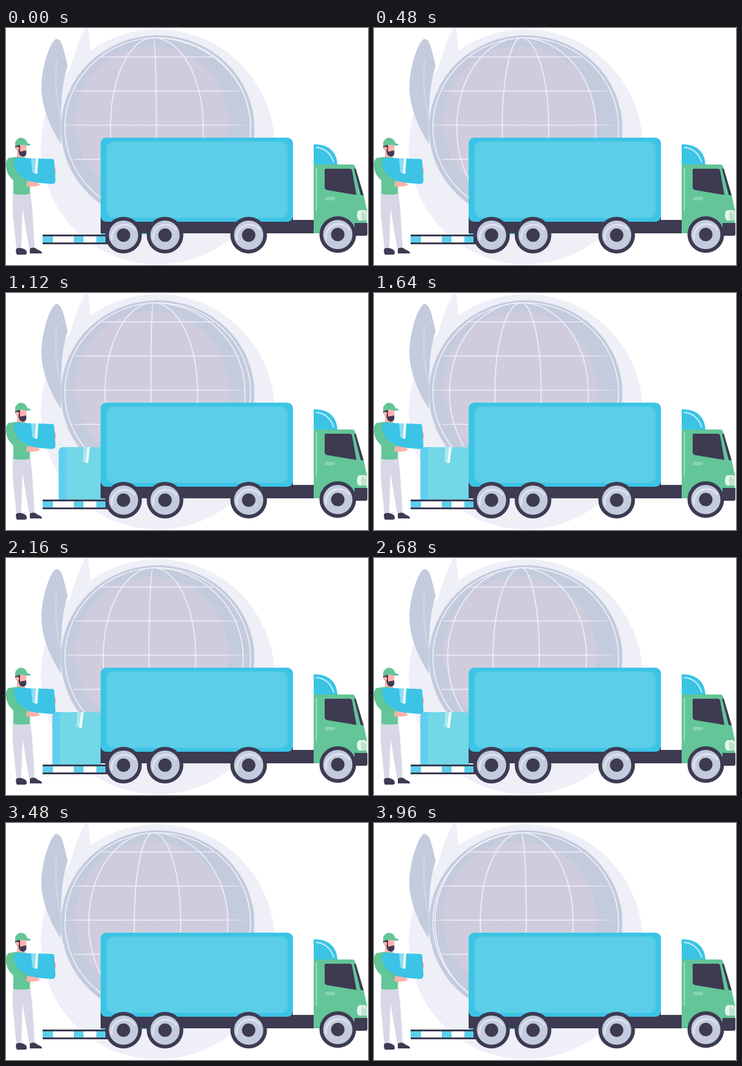
An HTML page that plays this animation: 593 by 389 pixels, repeating every 4 s.

```html
<!DOCTYPE html>
<html lang="en">
<head>
<meta charset="utf-8">
<title>Truck loading</title>
<style>
  html, body { margin: 0; width: 100%; height: 100%; overflow: hidden; background: #fff; }
  svg { display: block; width: 100vw; height: 100vh; }
  .dark { fill: #3d3a52; }
  .green { fill: #63c598; }
  .skin { fill: #fcb1ac; }
  .line { fill: none; stroke: #efeff7; stroke-width: 1.7; }
</style>
</head>
<body>
<svg viewBox="0 0 593 389">
  <defs>
    <linearGradient id="fade" gradientUnits="userSpaceOnUse" x1="97" y1="0" x2="393" y2="0">
      <stop offset="0" stop-color="#efeff7" stop-opacity=".5"/>
      <stop offset=".1" stop-color="#efeff7"/>
      <stop offset=".85" stop-color="#efeff7"/>
      <stop offset="1" stop-color="#efeff7" stop-opacity=".3"/>
    </linearGradient>
    <g id="wheel">
      <circle class="dark" r="30"/>
      <circle r="24" fill="#c3cbdd"/>
      <path d="M-19 8A21 21 0 0 1 19 -8" fill="none" stroke="#dfe3ee" stroke-width="3"/>
      <circle class="dark" r="11"/>
    </g>
  </defs>

  <!-- backdrop and leaves -->
  <ellipse cx="248.500" cy="195" rx="191.500" ry="193" fill="#eeeff7"/>
  <path d="M131 0C137 -1 136 22 139 42L150 90L92 140C98 80 116 22 131 0Z" fill="#eeeff7"/>
  <path d="M82 18C92 17 95 38 101 62C93 88 89 112 90 190C72 162 58 128 58 98C58 64 73 21 82 18Z" fill="#c3cbdd"/>
  <path d="M83 53C80 82 82 114 88 145" fill="none" stroke="#d3d3e1" stroke-width="3"/>

  <!-- globe -->
  <ellipse cx="248.500" cy="165" rx="158.500" ry="153" fill="#c3cbdd"/>
  <circle cx="239" cy="156" r="126" fill="#cfcddd"/>
  <ellipse class="line" cx="248.500" cy="163" rx="152" ry="147"/>
  <path d="M152 47.500H340M113 103.500H383M97 159.500H393M110 215.500H380" fill="none" stroke="url(#fade)" stroke-width="1.700"/>
  <g id="meridians"></g>

  <!-- ramp -->
  <path class="dark" d="M60 339H168V355H60Z"/>
  <path d="M60 342H163V352H60Z" fill="#fff"/>
  <path d="M60 342H77V352H60ZM111 342H127V352H111ZM148 342H163V352H148Z" fill="#5ccfe8"/>

  <!-- sliding parcel, placed at x = 0 -->
  <g id="parcel">
    <path d="M0 339V261Q0 253 8 253H72Q80 253 80 261V339Z" fill="#72d7e7"/>
    <path d="M0 339V261Q0 253 8 253H20Q12 253 12 261V339Z" fill="#5ecff0"/>
    <path d="M41 253H51L48 279L39 277Z" fill="#a9e6f0"/>
    <path d="M47 253H51L48 279H44Z" fill="#f2fbfd"/>
  </g>

  <!-- truck -->
  <path class="dark" d="M155 306H470V315H506V337H155Z"/>
  <rect x="155" y="180" width="315" height="138" rx="9" fill="#3bc4e6"/>
  <rect x="164.500" y="186" width="297.500" height="126" rx="12" fill="#50cae7"/>
  <rect x="165" y="186.500" width="294" height="125" rx="12" fill="#5bcee8"/>
  <path d="M504 191C528 190 542 203 543 225H504Z" fill="#3bc4e6"/>
  <path d="M508 196Q530 198 537 221" fill="none" stroke="#c9eff8" stroke-width="1.800"/>
  <path class="green" d="M504 224H567Q571 224 572 228L586 275L591 298V325H574V337H504Z"/>
  <path d="M508.500 229V300" stroke="#a5dec4" stroke-width="1.800"/>
  <path class="dark" d="M524 231H563Q566 231 567 234L574 274L526 266Q522 265 522 261V233Q522 231 524 231ZM570 231H573L586 275L581 274Z"/>
  <rect x="522" y="277" width="17" height="6" rx="3" fill="#87d3b0"/>
  <path d="M580 299H588Q590 299 591 305V316H580Q575 316 575 308Q575 299 580 299Z" fill="#e8f6ee"/>
  <path d="M583 300Q580 308 583 316H591V306Z" fill="#b9e6d0"/>
  <path class="dark" d="M571 320H592V338Q592 341 589 341H571Z"/>
  <use href="#wheel" x="192.500" y="340"/>
  <use href="#wheel" x="260.500" y="340"/>
  <use href="#wheel" x="397.500" y="340"/>
  <use href="#wheel" x="543.500" y="339"/>

  <!-- courier -->
  <path d="M11 270H40L43 298L47 362H38L27 296L25 362H17L11 302Z" fill="#d8d7e6"/>
  <path class="dark" d="M17 362Q25 359 33 365Q36 372 31 372H18Q15 367 17 362ZM39 362Q46 358 52 364Q60 367 59 370H39Z"/>
  <path class="skin" d="M18 200H31V214H18Z"/>
  <path class="skin" d="M18 192H33L34 207H22Z"/>
  <path class="dark" d="M15 192H23V203L33 201V208Q30 213 24 210Q21 208 20 199L15 196Z"/>
  <circle class="skin" cx="18.500" cy="198" r="3"/>
  <path class="green" d="M15 194V188Q18 180 25 180Q33 181 35 189L41 191Q39 194 34 193Q25 190 15 194Z"/>
  <path class="green" d="M8 213Q18 210 32 213Q41 222 40 245L39 272Q25 275 12 272V248Q0 238 0 224Q0 214 8 213Z"/>
  <path class="skin" d="M76 227Q82 226 82 234Q82 241 77 242ZM30 253L48 252L56 257Q50 262 32 260Z"/>
  <path d="M18 213L76 215Q79 215 79 219L81 250Q81 256 75 256L38 253Q13 247 13 222Q13 214 18 213Z" fill="#3bc4e6"/>
  <path d="M41 214H53L52 239L43 237Z" fill="#8bdeef"/>
  <path d="M49 214H53L51 239H47Z" fill="#e7f8fb"/>
  <path class="green" d="M5 213Q13 213 14 226Q18 243 37 250L34 260Q10 255 2 237Q-3 218 5 213Z"/>
  <path class="skin" d="M35 251L48 253L55 257Q49 261 33 259Z"/>
</svg>
<script>
const LOOP = 4000, LINES = 4;
const POLE_X = 241, GLOBE_Y = 163, GLOBE_RY = 147;
const parcel = document.getElementById('parcel');
const group = document.getElementById('meridians');

const meridians = Array.from({ length: LINES }, () => {
  const path = document.createElementNS('http://www.w3.org/2000/svg', 'path');
  path.setAttribute('class', 'line');
  return group.appendChild(path);
});

const ease = p => p < .5 ? 2 * p * p : 1 - 2 * (1 - p) ** 2;
const progress = (t, start, end) => ease(Math.min(1, Math.max(0, (t - start) / (end - start))));

// Each meridian crosses the globe from right to left in one loop.
function drawMeridian(path, turn) {
  const x = 401 - 304 * turn - 2.5 * Math.sin(Math.PI * turn);
  const rx = Math.max(.01, Math.abs(x - POLE_X));
  const sweep = x > POLE_X ? 1 : 0;
  path.setAttribute('d',
    `M${POLE_X} ${GLOBE_Y - GLOBE_RY}A${rx} ${GLOBE_RY} 0 0 ${sweep} ${POLE_X} ${GLOBE_Y + GLOBE_RY}`);
}

function draw(now) {
  const t = now % LOOP;
  meridians.forEach((path, i) => drawMeridian(path, (t / LOOP + i / LINES) % 1));
  const out = progress(t, 480, 1340) - progress(t, 2700, 3440);
  parcel.setAttribute('transform', `translate(${156 - 80 * out} 0)`);
  requestAnimationFrame(draw);
}
draw(performance.now());
</script>
</body>
</html>
```
